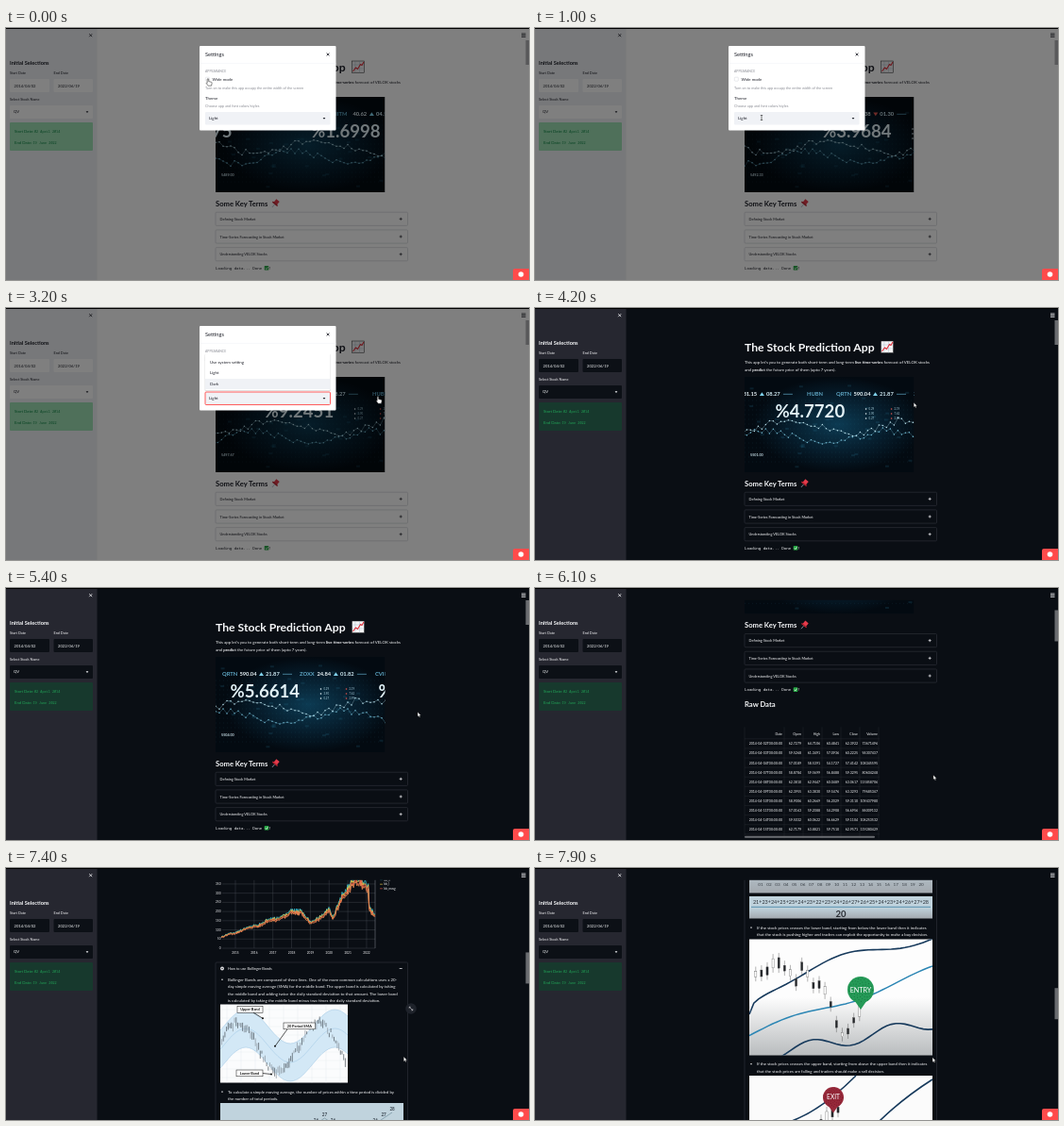
Write an HTML page that moves like this. It is 554 px wide and 267 px high and loops after 8000 ms.

```html
<!DOCTYPE html>
<html lang="en">
<head>
<meta charset="utf-8">
<title>Stock dashboard</title>
<style>
html,body{margin:0;width:100%;height:100%;overflow:hidden;background:#000}
svg{display:block;width:554px;height:267px;font-family:Lato,"Open Sans",sans-serif;
  --bg:#fff;--side:#f0f2f6;--in:#fff;--fg:#1d1f28;--dim:#8b8d95;--line:#d3d5da;--okbg:#9fe2b6;--ok:#0a8440;--bar:#b4b4b8}
svg.dark{--bg:#0a0e14;--side:#262730;--in:#0c1016;--fg:#f6f7f9;--dim:#9a9ca3;--line:#2b2f37;--okbg:#17392d;--ok:#23a558;--bar:#6a6c70}
text{fill:var(--fg);white-space:pre}
.b{font-weight:700}
.m{font-family:"Noto Sans Mono","DejaVu Sans Mono",monospace}
.e{text-anchor:end}
.c{text-anchor:middle}
.n{fill:none}
</style>
</head>
<body>
<svg id="stage" viewBox="0 0 554 267"></svg>
<script>
const LOOP = 8000, STEP = 100;
const $ = id => document.getElementById(id);
const stage = $('stage');
const {sin, cos, exp, sqrt, floor, round, max, min} = Math;

const rnd = n => { const v = sin(n * 127.1 + 11.7) * 43758.5; return v - floor(v); };
const jitter = (n, size) => (rnd(n) - .5) * size;
const list = (n, f) => Array.from({length: n}, (_, i) => f(i));
const repeat = (n, f) => list(n, f).join('');

const text = (x, y, size, s, cls = '', fill = '') =>
  `<text x="${x}" y="${y}" font-size="${size}" class="${cls}"${fill && ` style="fill:${fill}"`}>${s}</text>`;
const rect = (x, y, w, h, fill, more = '') =>
  `<rect x="${x}" y="${y}" width="${w}" height="${h}" style="fill:${fill}" ${more}/>`;
const path = (d, stroke, w = 1, more = '') =>
  `<path d="${d}" style="stroke:${stroke}" class="n" stroke-width="${w}" ${more}/>`;
const dot = (x, y, r, fill) => `<circle cx="${x}" cy="${y}" r="${r}" style="fill:${fill}"/>`;
const chevron = (x, y) => `<path d="M${x - 1.4} ${y - .7}h2.8l-1.4 1.7z" style="fill:var(--fg)"/>`;
const cross = (x, y, r) => path(`M${x - r} ${y - r}l${2 * r} ${2 * r}m0 ${-2 * r}l${-2 * r} ${2 * r}`, 'var(--fg)', .8);
const join = pts => 'M' + pts.map(p => p[0].toFixed(1) + ' ' + p[1].toFixed(1)).join('L');

// Path of y = f(u) for u from a to b, with u = 0..1 across the box
const graph = (x, w, f, a = 0, b = 1) =>
  join(list(41, i => { const u = a + (b - a) * i / 40; return [x + w * u, f(u)]; }));

// Linear interpolation in rows of [key, ...values]
function at(rows, k) {
  const i = rows.findIndex(r => r[0] >= k);
  if (i < 1) return (i ? rows[rows.length - 1] : rows[0]).slice(1);
  const a = rows[i - 1], b = rows[i], f = (k - a[0]) / (b[0] - a[0]);
  return a.slice(1).map((v, j) => v + (b[j + 1] - v) * f);
}

const PRICES = [[2014.2, 58], [2018.5, 205], [2019, 132], [2020, 208], [2020.2, 150], [2020.7, 290],
  [2021.7, 378], [2022.1, 330], [2022.13, 215], [2022.46, 165]];
function series(px, py, scale = 1, seed = 0) {
  return join(list(230, i => {
    const year = 2014.25 + i * .0358;
    const wave = 1 + sin(i / 5) * .04 + jitter(i, .1) + jitter(i + seed, .03);
    return [px(year), py(at(PRICES, year)[0] * wave * scale)];
  }));
}

function sidebar() {
  const field = (x, w, label, date) => text(x, 49.2, 3.8, label) +
    rect(x, 54, w, 14, 'var(--in)', 'rx="1"') + text(x + 4.5, 62.5, 4.15, date);
  const note = (y, x, label, date) => text(9, y, 4.3, label, '', 'var(--ok)') + text(x, y, 3.5, date, 'm', 'var(--ok)');
  return rect(0, 0, 96.5, 267, 'var(--side)') + cross(89.7, 7.7, 1.5) +
    text(4, 39, 5.7, 'Initial Selections', 'b') +
    field(4, 42, 'Start Date', '2014/04/02') + field(50.5, 41.5, 'End Date', '2022/06/19') +
    text(4, 77.4, 3.85, 'Select Stock Name') +
    rect(4, 82, 88, 14, 'var(--in)', 'rx="1"') + text(8, 90.4, 4.2, 'QV') + chevron(86, 89) +
    rect(4, 100, 88, 30, 'var(--okbg)', 'rx="1"') +
    note(111, 30, 'Start Date:', '02 April 2014') + note(123, 28.5, 'End Date:', '19 June 2022');
}

function intro() {
  const topics = ['Defining Stock Market', 'Time-Series Forecasting in Stock Market', 'Understanding VELOK Stocks'];
  const box = (s, i) => {
    const y = 195.2 + i * 18.7;
    return rect(222, y, 203.5, 14.2, 'none', 'rx="1" stroke="var(--line)" stroke-width=".7"') +
      text(226.5, y + 8.6, 3.87, s) + path(`M416.7 ${y + 7.1}h3m-1.5 -1.5v3`, 'var(--fg)', .7);
  };
  const pin = `<g transform="rotate(40 285 186)">${rect(283, 181.5, 4.4, 4.5, '#e33b4b') +
    rect(281.8, 185.5, 6.8, 1.4, '#b9222f') + path('M285.2 187v4', '#9ab', .7)}</g>`;
  return text(222, 45.6, 12.2, 'The Stock Prediction App', 'b') +
    rect(366.5, 35, 13, 12.5, '#f4f4f6', 'stroke="#222" stroke-width=".5"') +
    path('M370 35v12.5m4.5-12.5v12.5M366.5 39h13m-13 4h13', '#9fb8c8', .4) +
    path('M367.5 46l3-4 2 1.5 3-5 1.5 1 2-3.5', '#e0303a', 1.1) +
    text(222, 59.2, 4.36, 'This app let\'s you to generate both short-term and long-term <tspan class="b">live time-series</tspan> forecast of VELOK stocks') +
    text(222, 66.6, 4.36, 'and <tspan class="b">predict</tspan> the future price of them (upto 7 years).') +
    '<g id="video" clip-path="url(#screen)"></g>' +
    text(222, 188.7, 7.6, 'Some Key Terms', 'b') + pin + topics.map(box).join('') +
    text(222, 255.6, 4.1, 'Loading data... Done', 'm') + rect(273.7, 252, 4.6, 4.6, '#28a745', 'rx=".7"') +
    path('M274.7 254.4l1.1 1.2 1.7-2.4', '#fff', .7) + text(278.6, 255.6, 4.1, '!', 'm') +
    text(222, 273, 7.6, 'Raw Data', 'b');
}

function table() {
  const edge = i => i ? 262 + i * 20 : 262;
  const line = (cells, y) => cells.map((v, i) => text(edge(i) + (i > 4 ? 1 : 0), y, 3.55, v, 'e')).join('') +
    path(`M222 ${y + 3.6}H365`, 'var(--line)', .4);
  const row = i => {
    const day = 2 + i + (i > 2 ? 2 : 0) + (i > 7 ? 2 : 0), open = 60 + 3 * sin(i * 1.3 + 2);
    const prices = [open, open + .5 + rnd(i) * 2, open - 2 - rnd(i + 5), open + jitter(i + 9, 2)];
    return [`2014-04-${String(day).padStart(2, '0')}T00:00:00`, ...prices.map(p => p.toFixed(4)), floor(7e7 + rnd(i + 20) * 5e7)];
  };
  return line(['Date', 'Open', 'High', 'Low', 'Close', 'Volume'], 302.9) +
    repeat(10, i => line(row(i), 313 + i * 10.1)) +
    path('M222 294V412', 'var(--line)', .4) + repeat(6, i => path(`M${edge(i) + 2} 294V412`, 'var(--line)', .4)) +
    rect(222, 409.5, 138, 2, '#6b6d72', 'rx="1"');
}

function rawPlot() {
  const px = y => 245 + (y - 2014.25) * 19.02, py = v => 525 + (400 - v) * .155;
  const price = (y, label, v) => text(222, y, 4.3, label, 'b') +
    rect(222, y + 7.8, 9, 6.5, '#142019', 'rx="1"') + text(223.3, y + 12.5, 3.5, v, 'm', '#2fb463');
  return rect(222.5, 420, 5, 5, '#2f86d6', 'rx=".8"') + path('M225 421v2.5m-1.2-1.2l1.2 1.4 1.2-1.4', '#fff', .6) +
    text(229, 424, 4.3, 'Download Tabro File', '', '#3d97dc') + path('M229 424.8h38.5', '#3d97dc', .4) +
    price(436.2, 'Current Open Price in USD:', 161) + price(460.2, 'Current Close Price in USD:', 163) +
    text(222, 488.7, 7.6, 'Plotting The Raw Data', 'b') +
    rect(301, 483.5, 6, 4.5, '#dfe6ee', 'rx="1"') + dot(304, 485.6, 1.3, '#3a7fa8') + path('M305.5 486.5l3.5 3', '#d99a6c') +
    repeat(4, i => {
      const year = 2016 + i * 2, v = 400 - i * 100;
      return path(`M${px(year)} 525V581M245 ${py(v)}H401`, '#dfe2e6', .6) +
        text(px(year), 586.5, 3.2, year, 'c') + text(243.5, py(v) + 1.1, 3.2, v, 'e');
    }) +
    `<g transform="translate(232.5 553) rotate(-90)">${text(0, 0, 3.9, 'Price in $', 'c')}</g>` +
    path(series(px, py, 1, 40), '#5c8c7c', .9) + path(series(px, py, 1.01, 90), '#de7350', .8) +
    rect(245, 592, 156, 15, '#10151c', 'stroke="#333" stroke-width=".4"') +
    path(series(px, v => 606 - v * .033), '#de7350', .7) +
    rect(244, 592, 1.3, 15, '#e8e8ea') + rect(400.5, 592, 1.3, 15, '#e8e8ea');
}

function bandPlot() {
  const px = y => 243 + (y - 2015) * 19.85, py = v => 755 - v * .1945;
  const colors = ['#35b9c9', '#f0d04a', '#e8584a', '#ef8e55'], names = ['bb_h', 'bb_l', 'bb_mavg'];
  return text(222, 651, 7.6, 'Bollinger Bands', 'b') +
    repeat(8, i => path(`M${px(2015 + i)} 677V755`, '#4a4e56', .4) + text(px(2015 + i), 760.9, 3.2, 2015 + i, 'c')) +
    repeat(9, i => path(`M229 ${py(i * 50)}H391`, '#4a4e56', .4) + text(227.5, py(i * 50) + 1.1, 3.2, i * 50, 'e')) +
    path('M391 677V755', '#8b8e94', .5) +
    colors.map((c, i) => path(series(px, py, 1.05 - i * .03, 20 * i + 5), c, .8)).join('') +
    names.map((s, i) => path(`M396 ${682.6 + i * 4.6}h3`, colors[i], .6) + text(400.5, 683.6 + i * 4.6, 3.1, s)).join('');
}

function sampleBands() {
  const price = u => 860 - 26 * cos((u - .13) * 9.8), mean = u => 858 - 18 * cos((u - .2) * 9);
  const upper = u => mean(u) - 20, lower = u => mean(u) + 20;
  const tag = (x, y, w, s) => rect(x, y, w, 6.8, '#fff', 'stroke="#111" stroke-width=".5"') + text(x + w / 2, y + 4.7, 3.9, s, 'b c', '#111');
  const arrow = (x, y, dx, dy) => path(`M${x} ${y}l${dx} ${dy}`, '#111', .7) + dot(x + dx, y + dy, 1, '#111');
  return rect(227, 814.5, 135, 83, '#fbfcfd') +
    repeat(9, i => path(`M227 ${820 + i * 9}h135M${234 + i * 15} 814.5v83`, '#dde3e8', .3)) +
    `<path d="${graph(227, 135, upper)}${graph(227, 135, lower, 1, 0).replace('M', 'L')}Z" fill="#d3e8f6"/>` +
    [upper, lower, mean].map(f => path(graph(227, 135, f), '#9cc4e2', .5)).join('') +
    repeat(78, i => {
      const h = 3 + rnd(i + 70) * 7, y = price(i / 78) + jitter(i, 8) - h / 2;
      return path(`M${228.5 + i * 1.7} ${y}v${h}`, rnd(i + 9) > .4 ? '#4a525a' : '#8c949c', .7);
    }) +
    tag(245, 816.5, 27, 'Upper Band') + arrow(262, 823.3, 10, 6) +
    tag(294, 834, 33.5, '20 Period SMA') + arrow(298, 840.8, -13, 18) +
    tag(244, 884, 28, 'Lower Band') + arrow(272, 887.5, 9, 1);
}

function averages() {
  const values = list(20, i => round(23 + i * .15 + 2 * sin(i * .8 - 1)));
  const x = i => 239 + i * 8.95, y = v => 926 + (28 - v) * 6;
  return rect(227, 919, 194, 77.5, 'url(#steel)') +
    path(join(values.map((v, i) => [x(i), y(v) + 3])), '#7c98a6', .8) +
    values.map((v, i) => text(x(i), y(v) + 1, 4.6, v, 'b c', '#36414c') +
      text(x(i), 988.7, 4.6, String(i + 1).padStart(2, '0'), 'c', '#353b42')).join('') +
    rect(227, 1000, 194, 23.5, 'url(#steel)') +
    text(324, 1008, 5.45, values.join('+'), 'c', '#252b32') + path('M229 1011.3h190', '#3c7fa2', .8) +
    text(324, 1021.5, 9.5, '20', 'b c', '#2a2e34');
}

function signals() {
  const navy = '#173a5c';
  const upper = u => 1125 - 82 * sqrt(u) + 5 * sin(u * 9);
  const middle = u => 1147 - 69 * u + 4 * sin(u * 8 + 3);
  const lower = u => 1172 - 38 * u + 7 * sin(u * 14);
  const price = u => 1076 + 30 * u + 55 * exp(-(((u - .53) / .08) ** 2));
  const candle = (x, y, i) => {
    const h = 4 + rnd(i + 30) * 9;
    return path(`M${x} ${y - h / 2 - 5}v${h + 10}`, '#444', .4) +
      rect(x - 1.1, y - h / 2, 2.2, h, i % 3 ? '#24272b' : '#fff', 'stroke="#444" stroke-width=".3"');
  };
  const pin = (x, y, r, fill, dark, s, size) =>
    `<path d="M${x - r * .55} ${y + r * .7}L${x} ${y + r * 1.5}L${x + r * .55} ${y + r * .7}z" fill="${fill}"/>` + dot(x, y, r, fill) +
    repeat(60, i => { const d = r * .94 * sqrt(i / 60); return dot(x + d * cos(i * 2.4), y + d * sin(i * 2.4), .55, dark); }) +
    text(x, y + size * .36, size, s, 'c', '#fff');
  return rect(227, 1045.5, 194, 123, 'url(#paper)') + '<g clip-path="url(#entry)">' +
    path(graph(227, 194, upper), navy, 1.6) + path(graph(227, 194, middle), '#2c86b4', 1.5) + path(graph(227, 194, lower), navy, 1.6) +
    repeat(19, i => { const u = .035 + i * .0315; return candle(227 + 194 * u, price(u) + jitter(i, 22), i); }) + '</g>' +
    pin(345, 1099, 14, '#259a57', '#177541', 'ENTRY', 7.2) +
    rect(227, 1190, 194, 123, '#fbfbfb') +
    path('M266 1240Q300 1230 340 1190M358 1245Q385 1217 421 1194', navy, 1.6) +
    repeat(6, i => candle(291 + i * 6, 1244 - i * 4 + rnd(i) * 9, i)) +
    pin(316, 1213, 11, '#97293a', '#7a1c2c', 'EXIT', 6.6);
}

function guide() {
  const bullet = (y, ...lines) => path(`M228.2 ${y - 1.5}h1.6`, 'var(--fg)') +
    lines.map((s, i) => text(235, y + i * 7.45, 4.36, s)).join('');
  return rect(222, 770, 203.5, 600, 'none', 'rx="1" stroke="var(--line)" stroke-width=".7"') +
    dot(229, 776.5, 1.9, '#e8e9ec') + dot(229, 776.5, .7, '#222') +
    text(235, 778.2, 3.87, 'How to use Bollinger Bands') + path('M416.7 776.5h3', 'var(--fg)', .7) +
    bullet(789.7, 'Bollinger Bands are composed of three lines. One of the more common calculations uses a 20-',
      'day simple moving average (SMA) for the middle band. The upper band is calculated by taking',
      'the middle band and adding twice the daily standard deviation to that amount. The lower band',
      'is calculated by taking the middle band minus two times the daily standard deviation.') +
    sampleBands() +
    bullet(908.6, 'To calculate a simple moving average, the number of prices within a time period is divided by',
      'the number of total periods.') +
    averages() +
    bullet(1034.6, 'If the stock prices crosses the lower band, starting from below the lower band then it indicates',
      'that the stock is pushing higher and traders can exploit the opportunity to make a buy decision.') +
    bullet(1179.2, 'If the stock prices crosses the upper band, starting from above the upper band then it indicates',
      'that the stock prices are falling and traders should make a sell decision.') +
    signals();
}

const expand = (id, x, y) => `<g id="${id}">${dot(x, y, 5.8, '#1e222a')}` +
  path(`M${x - 1.8} ${y - .3}v-1.5h1.5m-1.5 0l3.6 3.6m0 -1.5v1.5h-1.5`, '#d8d9dc', .6) + '</g>';

function modal() {
  return rect(0, 0, 554, 267, 'rgba(0,0,0,.5)') + rect(205, 19, 144.5, 89.5, 'var(--bg)', 'rx="1"') +
    text(211, 30, 5.7, 'Settings') + cross(341, 28, 1.4) + path('M205 37.5h144.5', 'var(--side)', .5) +
    text(211, 46.8, 3.45, 'APPEARANCE', '', 'var(--dim)') +
    rect(211.3, 52.2, 4, 4, 'var(--bg)', 'rx=".6" stroke="var(--line)" stroke-width=".5"') +
    text(218.5, 55.7, 4.28, 'Wide mode') +
    text(211, 64.6, 3.8, 'Turn on to make this app occupy the entire width of the screen', '', 'var(--dim)') +
    text(211, 76.4, 4.4, 'Theme') + text(211, 84.4, 3.85, 'Choose app and font colors/styles', '', 'var(--dim)') +
    rect(211, 89, 132.5, 13.5, 'var(--side)', 'id="field" rx="1" stroke-width=".9"') +
    '<text id="choice" x="215" y="97.4" font-size="4.45"></text>' + chevron(337, 95.7) +
    '<g id="menu">' + rect(210.5, 49, 133.5, 39, 'rgba(0,0,0,.12)', 'rx="1"') +
    rect(211, 48.5, 132.5, 38.5, 'var(--bg)', 'rx="1"') + rect(211, 75, 132.5, 11, 'var(--side)', 'id="hover"') +
    ['Use system setting', 'Light', 'Dark'].map((s, i) => text(216, 58.7 + i * 11.5, 4.4, s)).join('') + '</g>';
}

const fade = (id, from, to) => `<linearGradient id="${id}" x2="0" y2="1">
  <stop offset=".5" stop-color="${from}"/><stop offset="1" stop-color="${to}"/></linearGradient>`;

stage.innerHTML = `<defs>
  <clipPath id="screen"><rect x="222" y="73" width="179.5" height="101"/></clipPath>
  <clipPath id="entry"><rect x="227" y="1045.5" width="194" height="123"/></clipPath>
  <radialGradient id="sea" cx=".55" cy=".5"><stop offset="0" stop-color="#0c3a52"/><stop offset=".6" stop-color="#061c2b"/><stop offset="1" stop-color="#030a11"/></radialGradient>
  ${fade('steel', '#c0d3dd', '#a3a9af')}${fade('paper', '#fdfdfd', '#b9bcbe')}</defs>` +
  rect(0, 0, 554, 267, 'var(--bg)') +
  `<g id="page">${intro()}${table()}${rawPlot()}${bandPlot()}${guide()}${expand('zoomPlot', 433, 500)}${expand('zoomImage', 429, 819)}</g>` +
  rect(96, 0, 458, 12.8, 'var(--bg)') + sidebar() +
  path('M546 6h4.5m-4.5 1.7h4.5m-4.5 1.7h4.5', 'var(--fg)', .8) +
  rect(550.5, 13, 3.5, 26, 'var(--bar)', 'id="thumb"') +
  `<g id="modal">${modal()}</g>` + rect(0, 0, 554, 1, '#000') +
  '<path d="M537 267v-10q0-2 2-2h15v12z" fill="#ff4b4b"/>' + dot(545.5, 261, 2.8, '#fff') +
  '<g id="cursor"></g>';

// Clip time stands still while the recording stalls
const CLIP = [[0, 0], [2100, 2100], [2700, 2100], [4900, 4300], [5200, 4300], [8000, 7100]];
const FIGURES = ['1.6998', '3.9684', '9.2451', '8.0936', '4.7720', '5.6614', '6.2083'];
const TICKER = [[349, 'IITM', '40.62', 1, '04.14'], [427, 'KVO', '76.38', 0, '01.30'], [562, 'TRQS', '31.15', 1, '08.27'],
  [648, 'HUBN'], [679, 'QRTN', '590.04', 1, '21.87'], [761, 'ZOXX', '24.84', 1, '01.82'], [841, 'CVIR', '61.20', 0, '03.75']];

function ticker(x, name, value, rise, delta) {
  const blue = '#5fa6c4', vx = x + name.length * 4.6;
  if (!value) return text(x, 93.2, 5.8, name, 'b', blue);
  const tx = vx + value.length * 3.1 + 2;
  return text(x, 93.2, 5.8, name, 'b', blue) + text(vx, 93.2, 5.8, value, 'b', '#e9f4f8') +
    `<path d="M${tx} ${rise ? 93 : 89.5}h5l-2.5 ${rise ? -3.8 : 3.8}z" fill="${rise ? '#7fd0ea' : '#e0574f'}"/>` +
    text(tx + 7, 93.2, 5.8, delta, 'b', '#cfe9f2') + path(`M${tx + 25} 91.3h10`, blue, .7);
}

function video(v) {
  const x = 323 - v * .019, drift = v * .016, first = floor(drift / 4);
  const wave = (seed, y0, color) => {
    const pts = list(48, i => {
      const k = i + first + seed;
      return [222 + i * 4 - drift % 4, y0 + sin(k * .2) * 7 + jitter(k, 7)];
    });
    return path(join(pts), color, .3) + pts.map(p => dot(...p, .75, color)).join('');
  };
  return rect(222, 73, 179.5, 101, 'url(#sea)') +
    repeat(14, i => path(`M222 ${98 + i * 5}h180`, '#3b8aa5', .4, 'stroke-dasharray=".6 3.4" opacity=".45"')) +
    repeat(40, i => rect(222 + rnd(i) * 176, 78 + rnd(i + 50) * 90, 4, 2, '#2a7490', 'opacity=".2"')) +
    wave(3, 137, '#6fb4cc') + wave(60, 126, '#b4dce8') +
    TICKER.map(([tx, ...r]) => ticker(tx - v * .1, ...r)).join('') +
    [-157, 0, 157].map(d => text(x + d, 116, 18.6, '%' + (d ? '4.2375' : FIGURES[min(6, floor(v / 900))]), 'b', '#e3f2f7')).join('') +
    repeat(6, i => {
      const sx = x + 96 + i % 2 * 27, y = 107 + floor(i / 2) * 5;
      return dot(sx, y, .8, i % 2 ? '#e0574f' : '#e8f4f8') + text(sx + 3, y + 1, 2.8, (rnd(i + 4) * 9).toFixed(2), '', '#a9cfdd');
    }) +
    text(228, 157.3, 3.7, (5489 + v / 300).toFixed(2), 'b', '#cfe6ee');
}

const POINTER = [[300, 214, 54], [900, 240, 95], [1400, 240, 95], [2000, 231, 79], [2700, 231, 79], [3200, 394, 94],
  [4100, 394, 94], [4900, 452, 144], [5200, 452, 144], [5400, 436, 131.5], [6000, 422, 198], [8000, 421, 201]];
const SCROLL = [[5700, 0], [6600, 330], [7400, 670], [8000, 1030]];
const SHAPES = {
  hand: '<path d="M-.8 0q.9-.8 1.5 0v2.6l3 .7q.6.3.4 1.3l-.5 2.6h-3.4l-2-2.6q.2-.9 1-.3z" fill="#fff" stroke="#111" stroke-width=".5"/>',
  beam: path('M-1.2-2.5h2.4m-1.2 0v5m-1.2 0h2.4', '#222', .6),
  arrow: '<path d="M0 0v4.8l1.1-1 .8 1.7.9-.4-.8-1.6h1.5z" fill="#fff" stroke="#111" stroke-width=".3"/>'
};

const show = (id, on) => { $(id).style.display = on ? '' : 'none'; };

function draw(t) {
  const [scroll] = at(SCROLL, t), [x, y] = at(POINTER, t);
  const dark = t >= 3600, menu = t >= 1500 && !dark, focus = y + scroll;
  const shape = t >= 4000 ? 'arrow' : t >= 700 && t < 1700 ? 'beam' : 'hand';
  stage.classList.toggle('dark', dark);
  $('page').setAttribute('transform', `translate(0 ${-scroll})`);
  $('thumb').setAttribute('y', 13 + max(0, scroll * .126 - 8));
  $('thumb').setAttribute('height', 26 + min(7, scroll / 10));
  if (scroll < 180) $('video').innerHTML = video(at(CLIP, t)[0]);
  show('modal', t < 4000);
  show('menu', menu);
  $('hover').setAttribute('y', t < 1900 ? 63.5 : 75);
  $('field').setAttribute('stroke', menu ? '#ff4b4b' : 'none');
  $('choice').textContent = dark ? 'Dark' : 'Light';
  show('zoomPlot', focus > 495 && focus < 625);
  show('zoomImage', focus > 814 && focus < 898);
  $('cursor').setAttribute('transform', `translate(${x} ${y})`);
  $('cursor').innerHTML = SHAPES[shape];
}

let last = -1;
function tick() {
  const t = floor(performance.now() % LOOP / STEP) * STEP;
  if (t !== last) draw(last = t);
  requestAnimationFrame(tick);
}
tick();
</script>
</body>
</html>
```
